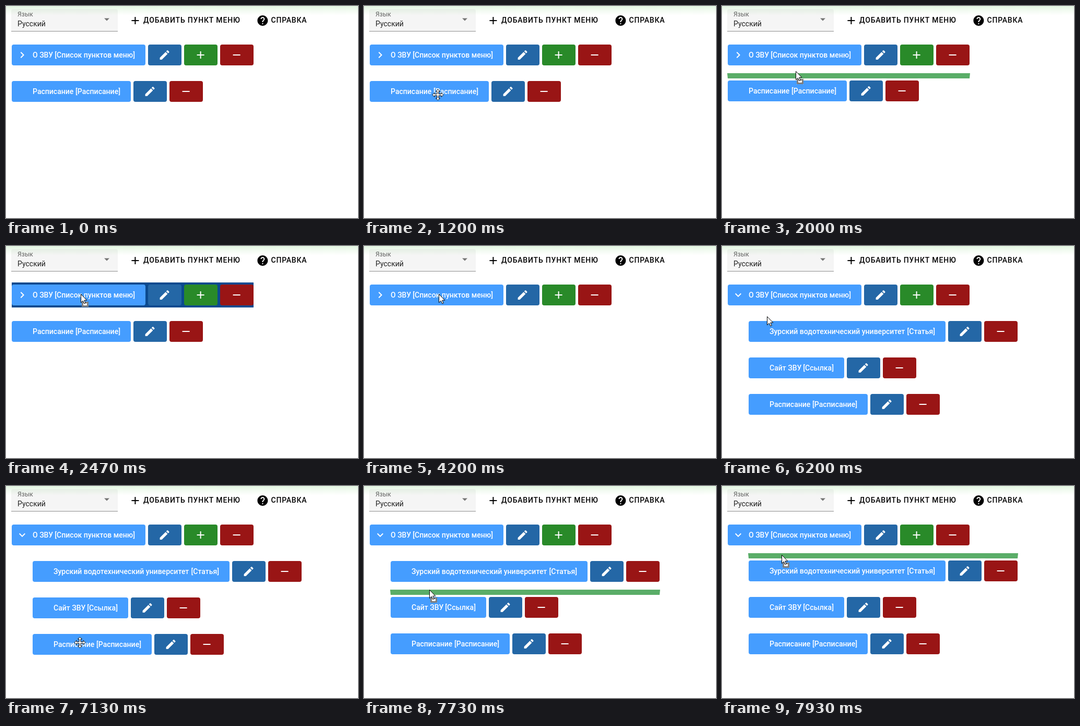
Write an HTML page with a canvas that moves like this. It is 674 px wide and 407 px high and loops after 8000 ms.

```html
<!DOCTYPE html>
<html lang="ru">
<head>
<meta charset="utf-8">
<title>Редактор меню</title>
<style>
html, body { margin: 0; width: 100%; height: 100%; overflow: hidden; background: #fff; }
canvas { display: block; }
</style>
</head>
<body>
<canvas id="stage" width="674" height="407"></canvas>
<script>
const ctx = document.getElementById('stage').getContext('2d');
const W = 674, H = 407, LOOP = 8000, FPS = 15;
const FONT = 'Roboto, "Noto Sans", sans-serif';
const BLUE = '#459dff', EDIT = '#2467a6', ADD = '#298a29', DEL = '#991515';

const ICON = {
  add: new Path2D('M19 13h-6v6h-2v-6H5v-2h6V5h2v6h6v2z'),
  remove: new Path2D('M19 13H5v-2h14v2z'),
  edit: new Path2D('M3 17.25V21h3.75L17.81 9.94l-3.75-3.75L3 17.25zM20.71 7.04a.996.996 0 0 0 0-1.41l-2.34-2.34a.996.996 0 0 0-1.41 0l-1.83 1.83 3.75 3.75 1.83-1.83z'),
  right: new Path2D('M10 6L8.59 7.41 13.17 12l-4.58 4.59L10 18l6-6z'),
  down: new Path2D('M16.59 8.59L12 13.17 7.41 8.59 6 10l6 6 6-6z'),
  help: new Path2D('M12 2C6.48 2 2 6.48 2 12s4.48 10 10 10 10-4.48 10-10S17.52 2 12 2zm1 17h-2v-2h2v2zm2.07-7.75l-.9.92C13.45 12.9 13 13.5 13 15h-2v-.5c0-1.1.45-2.1 1.17-2.83l1.24-1.26c.37-.36.59-.86.59-1.41 0-1.1-.9-2-2-2s-2 .9-2 2H8c0-2.21 1.79-4 4-4s4 1.79 4 4c0 .88-.36 1.68-.93 2.25z')
};
const ARROW = new Path2D('M.5 .5V16.7L4.3 13.2 6.8 18.7 9.2 17.7 6.8 12.2H11.8Z');
const HAND = new Path2D('M5 2.5a2 2 0 0 1 4 0V8.5c.6-.8 3-.6 3.4.8c.8-.8 2.5-.4 2.8.9c1-.5 2.3.2 2.3 1.6V16c0 3-1.5 4-1.5 7.3H7.5c0-2-1-3.3-2.5-5.3L1.2 13.4c-1.2-2 1-3.6 2.6-2.2L5 12.6Z');
const FINGERS = new Path2D('M9 8v4M12.4 9.3v3M15.2 10.2v2.4');
const MOVE = new Path2D();
for (let k = 0; k < 4; k++) {
  for (const [x, y] of [[0, -10.5], [4, -6.5], [1.5, -6.5], [1.5, -1.5], [6.5, -1.5], [6.5, -4]]) {
    const c = [1, 0, -1, 0][k], s = [0, 1, 0, -1][k];
    MOVE.lineTo(x * c - y * s, x * s + y * c);
  }
}
MOVE.closePath();

// Pointer keys: time, x, y, and 1 where it passes without stopping.
const KEYS = [
  [400, 629, 398], [1200, 141, 170], [1267, 140, 168], [1400, 139, 165],
  [1533, 139, 165], [2400, 143, 93], [2467, 143, 92], [4600, 143, 92],
  [4867, 80, 90, 1], [5000, 33, 94], [5533, 33, 94], [6200, 86, 135, 1],
  [6400, 111, 153, 1], [6800, 148, 228, 1], [7133, 141, 300], [7267, 141, 303],
  [7467, 141, 303], [7933, 114, 132]
];

function slope(i, c) {
  if (!KEYS[i][3]) return 0;
  const a = KEYS[i - 1], b = KEYS[i + 1];
  return (b[c] - a[c]) / (b[0] - a[0]);
}

function pointer(t) {
  const last = KEYS.length - 1;
  if (t >= KEYS[last][0]) return { x: KEYS[last][1], y: KEYS[last][2] };
  let i = 0;
  while (i < last - 1 && t >= KEYS[i + 1][0]) i++;
  const a = KEYS[i], b = KEYS[i + 1], d = b[0] - a[0];
  const u = Math.max(0, (t - a[0]) / d), v = 1 - u;
  const at = c => Math.round(
    (1 + 2 * u) * v * v * a[c] + u * v * v * d * slope(i, c) +
    u * u * (3 - 2 * u) * b[c] - u * u * v * d * slope(i + 1, c));
  return { x: at(1), y: at(2) };
}

function rows(t) {
  const list = [{ x: 11, y: 74, w: 256, name: 'О ЗВУ', kind: '[Список пунктов меню]', folder: true, end: 474 }];
  const plan = (x, y, w, name, kind, end) => list.push({ x, y, w, name, kind, end });
  if (t < 4195) plan(11, 144, 228, 'Расписание', '[Расписание]', 474);
  if (t >= 5260) {
    plan(51, 144, 377, 'Зурский водотехнический университет', '[Статья]', 566);
    plan(51, 214, 183, 'Сайт ЗВУ', '[Ссылка]', 566);
    plan(51, 284, 228, 'Расписание', '[Расписание]', 566);
  }
  return list;
}

function text(str, x, y, font, color, spacing = 0, align = 'left') {
  ctx.font = font + ' ' + FONT;
  ctx.letterSpacing = spacing + 'px';
  ctx.fillStyle = color;
  ctx.textAlign = align;
  ctx.fillText(str, x, y);
}

function icon(name, x, y, color) {
  ctx.save();
  ctx.translate(x, y);
  ctx.fillStyle = color;
  ctx.fill(ICON[name]);
  ctx.restore();
}

function box(x, y, w, h, color, radius = 4) {
  ctx.fillStyle = color;
  ctx.beginPath();
  ctx.roundRect(x, y, w, h, radius);
  ctx.fill();
}

function poly(color, ...pts) {
  ctx.fillStyle = color;
  ctx.beginPath();
  for (const [x, y] of pts) ctx.lineTo(x, y);
  ctx.fill();
}

function toolbar() {
  const glow = ctx.createLinearGradient(0, 0, 0, 18);
  glow.addColorStop(0, '#e2f6e1');
  glow.addColorStop(0.5, '#f3fbf2');
  glow.addColorStop(1, '#ffffff');
  ctx.fillStyle = glow;
  ctx.fillRect(0, 0, W, 18);

  box(10, 6, 204, 43, 'rgba(0,0,0,.04)', [4, 4, 0, 0]);
  ctx.fillStyle = '#8e8e8e';
  ctx.fillRect(10, 48, 204, 1);
  text('Язык', 22, 20, '400 12px', 'rgba(0,0,0,.6)', 0.1);
  text('Русский', 22, 39, '400 14px', 'rgba(0,0,0,.87)');
  poly('#757575', [188, 23.5], [198, 23.5], [193, 28.5]);

  icon('add', 235.4, 16, '#000');
  text('ДОБАВИТЬ ПУНКТ МЕНЮ', 263, 32, '500 14px', '#000', 0.8);
  icon('help', 479.4, 16, '#000');
  text('СПРАВКА', 507.5, 32, '500 14px', '#000', 0.8);
}

function row(r, y, open) {
  box(r.x, y, r.w, 40, BLUE);
  if (r.folder) icon(open ? 'down' : 'right', r.x + 8, y + 8, '#fff');
  text(r.name, r.x + 40, y + 25, '500 14px', '#fff');
  text(r.kind, r.x + r.w - 20, y + 25, '500 14px', '#fff', 0, 'right');
  const buttons = [['edit', EDIT], ['add', ADD], ['remove', DEL]].filter(b => r.folder || b[0] !== 'add');
  buttons.forEach(([name, color], i) => {
    const x = r.x + r.w + 5 + i * 69;
    box(x, y, 64, 40, color);
    icon(name, x + 19.6, y + 8, '#fff');
  });
}

function outline(path, x, y) {
  ctx.save();
  ctx.translate(x, y);
  ctx.lineJoin = 'round';
  ctx.lineWidth = 1;
  ctx.fillStyle = '#fff';
  ctx.strokeStyle = '#000';
  ctx.fill(path);
  ctx.stroke(path);
  if (path === HAND) ctx.stroke(FINGERS);
  ctx.restore();
}

function dragMark(x, y) {
  for (let j = 0; j < 10; j++) {
    for (let i = 0; i < 13; i++) {
      const rim = i < 3 || i > 9 || j < 3 || j > 6;
      ctx.fillStyle = rim && (i + j) % 2 === 0 ? '#000' : '#fff';
      ctx.fillRect(x + i, y + j, 1, 1);
    }
  }
}

function cursor(p, t, list, dragging) {
  const over = list.some(r => p.x >= r.x && p.x < r.x + r.w && p.y >= r.y && p.y < r.y + 40);
  const onChevron = Math.hypot(p.x - 31, p.y - 94) < 14;
  const dropped = t >= 4195 && t < 4260;
  if (dragging) dragMark(p.x + 2, p.y + 15);
  if (dragging || dropped || !over) outline(ARROW, p.x, p.y);
  else if (onChevron) outline(HAND, p.x - 5.5, p.y + 0.5);
  else outline(MOVE, p.x + 0.5, p.y + 0.5);
}

function draw(t) {
  ctx.fillStyle = '#fff';
  ctx.fillRect(0, 0, W, H);
  toolbar();

  const list = rows(t), p = pointer(t);
  const dragging = (t >= 1595 && t < 4195) || t >= 7525;
  const slot = dragging ? list.findIndex((r, i) => i && p.y > r.y - 26 && p.y < r.y - 4) : -1;

  if (dragging && p.y >= 70 && p.y <= 118) {
    ctx.fillStyle = '#0b4a8f';
    ctx.fillRect(11, 70, 463, 48);
  }
  list.forEach((r, i) => row(r, slot > 0 && i >= slot ? r.y - 1 : r.y, t >= 5260));
  if (slot > 0) {
    const { x, y, end } = list[slot];
    poly('#5aad68', [x - 1, y - 15], [end + 1, y - 15], [end, y - 5], [x, y - 5]);
  }
  if (t >= 5195 && t < 5725) {
    ctx.fillStyle = 'rgba(255,255,255,.09)';
    ctx.beginPath();
    ctx.arc(31, 94, 13.5, 0, Math.PI * 2);
    ctx.fill();
  }
  if (t >= 399) cursor(p, t, list, dragging);
}

const start = performance.now();
function tick() {
  const t = (performance.now() - start) % LOOP;
  draw(Math.floor((t + 4) * FPS / 1000) * 1000 / FPS % LOOP);
  requestAnimationFrame(tick);
}
tick();
</script>
</body>
</html>
```
